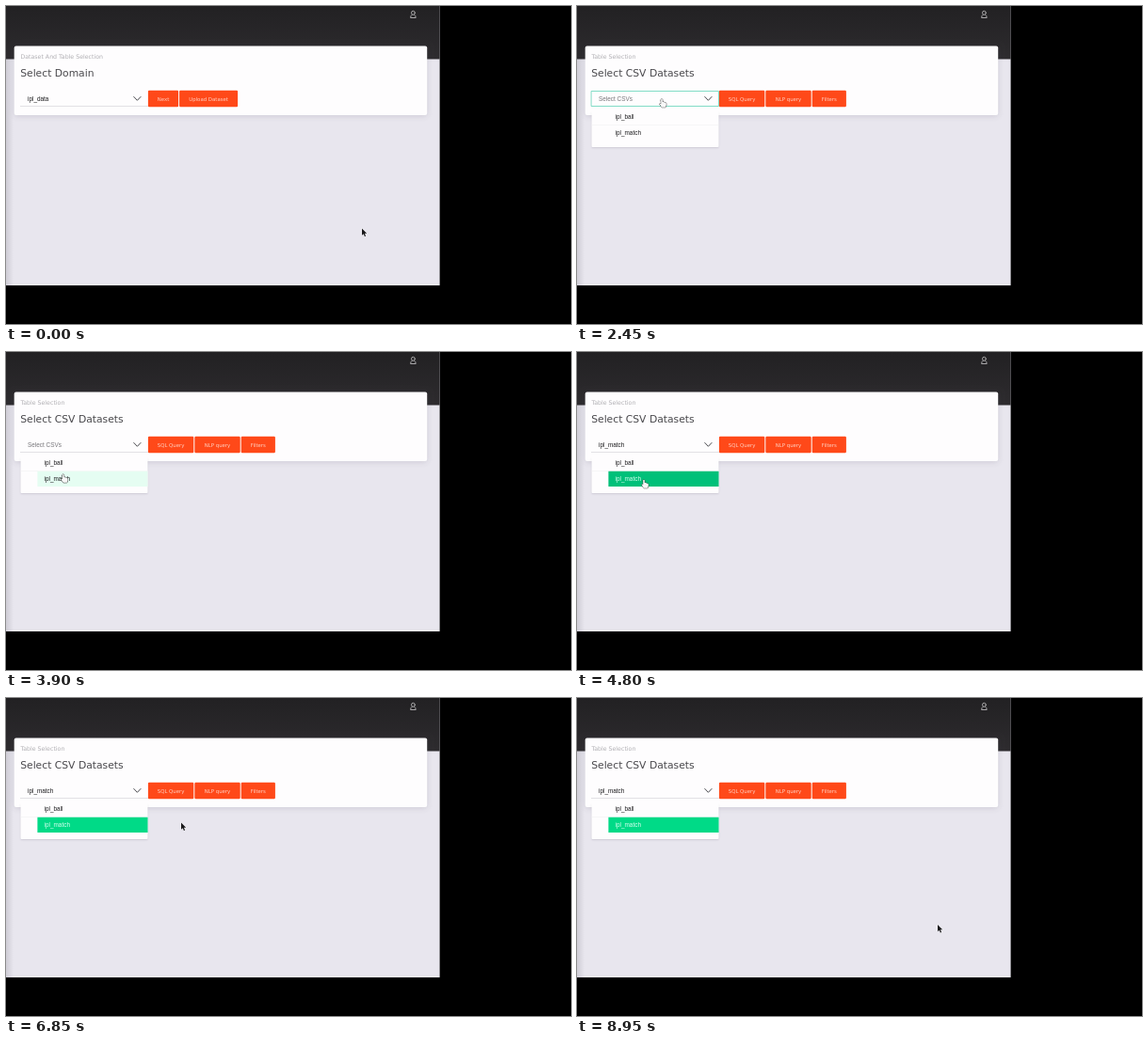
Recreate the animation shown at these times as an HTML page with a canvas. Size 600 by 338 pixels, loop 9050 ms.

```html
<!DOCTYPE html>
<html lang="en">
<head>
<meta charset="utf-8">
<title>Dataset selection</title>
<style>
html, body { margin: 0; width: 100%; height: 100%; overflow: hidden; background: #000; }
canvas { display: block; width: 600px; height: 338px; }
</style>
</head>
<body>
<canvas id="stage"></canvas>
<script>
const W = 600, H = 338, LOOP = 9050, STEP = 50;
const canvas = document.getElementById('stage');
const ctx = canvas.getContext('2d');
const dpr = window.devicePixelRatio || 1;
canvas.width = Math.round(W * dpr);
canvas.height = Math.round(H * dpr);

const UI = '"DejaVu Sans", sans-serif';
const FORM = '"Liberation Sans", Arial, sans-serif';
const INK = '#1c1c1e', CARD = '#fefdfe';

// Moments of the hard changes, in ms
const PAGE = 1800, FOCUS = 2350, BLUR = 2850, PICK = 4400;

// The pointer rests between eased moves
const home = { x: 378, y: 236.5 };
const moves = [
  { from: 300, to: 500, x: 238, y: 140.5 },
  { from: 900, to: 1400, x: 168, y: 99 },
  { from: 1850, to: 2300, x: 90, y: 98.5 },
  { from: 2600, to: 3200, x: 48, y: 126 },
  { from: 3350, to: 3750, x: 58, y: 128 },
  { from: 3750, to: 4250, x: 71, y: 135.5 },
  { from: 4800, to: 5450, x: 186, y: 132.5 },
  { from: 6000, to: 6400, x: 63, y: 107 },
  { from: 6400, to: 6850, x: 186, y: 132.5 },
  { from: 7800, to: 8050, x: 330, y: 192 },
  { from: 8200, to: 8750, x: 383, y: 241 }
];

const select = { x: 15, y: 90, w: 136, h: 17 };
const list = { x: 15.5, y: 108, w: 135, h: 42 };
const rows = ['ipl_ball', 'ipl_match'].map((label, i) =>
  ({ label, x: list.x, y: 110 + 16.7 * i, w: list.w, h: 16.7 }));

// Buttons stand in a row after the select box
function buttonRow(widths) {
  let x = 150.9;
  return Object.entries(widths).map(([label, w]) => {
    const b = { label, x, y: 89.8, w, h: 17.4 };
    x += w + 1;
    return b;
  });
}
const pages = [
  { caption: 'Dataset And Table Selection', title: 'Select Domain',
    buttons: buttonRow({ 'Next': 32.2, 'Upload Dataset': 62 }) },
  { caption: 'Table Selection', title: 'Select CSV Datasets',
    buttons: buttonRow({ 'SQL Query': 48.4, 'NLP query': 48.4, 'Filters': 36.2 }) }
];

const ease = u => u * u * (3 - 2 * u);

function pointer(t) {
  let p = home;
  for (const m of moves) {
    if (t <= m.from) break;
    const e = ease(Math.min(1, (t - m.from) / (m.to - m.from)));
    p = { x: p.x + (m.x - p.x) * e, y: p.y + (m.y - p.y) * e };
  }
  return p;
}

const inside = (p, b) => p.x >= b.x && p.x < b.x + b.w && p.y >= b.y && p.y < b.y + b.h;

function box(x, y, w, h, fill, r = 0) {
  ctx.fillStyle = fill;
  ctx.beginPath();
  ctx.roundRect(x, y, w, h, r);
  ctx.fill();
}

function shadowBox(x, y, w, h, r, blur, alpha) {
  ctx.save();
  ctx.shadowColor = `rgba(60, 55, 80, ${alpha})`;
  ctx.shadowBlur = blur * dpr;
  ctx.shadowOffsetY = dpr;
  box(x, y, w, h, CARD, r);
  ctx.restore();
}

function text(str, x, y, size, color, family = UI, align = 'left') {
  ctx.font = `${size}px ${family}`;
  ctx.textAlign = align;
  ctx.fillStyle = color;
  ctx.fillText(str, x, y);
}

function gradient(x, y, from, to) {
  const g = ctx.createLinearGradient(0, 0, x, y);
  g.addColorStop(0, from);
  g.addColorStop(1, to);
  return g;
}

function stroke(shape, color, width) {
  ctx.strokeStyle = color;
  ctx.lineWidth = width;
  ctx.lineJoin = ctx.lineCap = 'round';
  ctx.stroke(shape);
}

const userIcon = new Path2D('M434.3 7.3a1.9 2 0 1 1-3.8 0a1.9 2 0 1 1 3.8 0M431 9.4Q429.6 10.2 429.6 12.5H435.2Q435.2 10.2 433.8 9.4');
const chevron = new Path2D('M135.8 96.5L139.4 100.3L143 96.5');
const arrow = new Path2D('M0 0V7.2L1.7 5.7L2.9 8.4L4.1 7.9L2.9 5.3H5.2Z');
const hand = new Path2D('M-.8 .8Q0-.2.8 .8V3.5Q1.6 3 2.1 3.8Q3 3.4 3.4 4.3Q4.7 4 4.8 5.3V6.8L4 9.2H0L-2.3 5.8Q-2.5 4.5-.8 5.4Z');

function backdrop() {
  box(0, 0, W, H, '#000');
  box(0, 0, 460.6, 297, '#e8e6ee');
  box(0, 56, 8, 241, gradient(8, 0, 'rgba(70,68,80,.16)', 'rgba(70,68,80,0)'));
  box(0, 0, 460.6, 56.4, gradient(0, 56, '#222123', '#2d2b2e'));
  stroke(userIcon, '#c9c8ca', 0.8);
  shadowBox(8.7, 42.6, 438.5, 73.4, 2, 6, 0.16);
}

function form(t, p, page) {
  text(page.caption, 15.4, 56.1, 6.25, '#b0afb3');
  text(page.title, 15.2, 74.5, 10.75, '#49484c');

  for (const b of page.buttons) {
    box(b.x, b.y, b.w, b.h, inside(p, b) ? '#ff6d46' : '#ff4919', 1.2);
    text(b.label, b.x + b.w / 2, 100.6, 5.4, '#ffd0c2', UI, 'center');
  }

  const second = page === pages[1], picked = t >= PICK;
  if (second) dropdown(p, picked);

  if (t >= FOCUS && t < BLUR) {
    ctx.strokeStyle = '#74d9c0';
    ctx.lineWidth = 0.9;
    ctx.strokeRect(select.x + 0.5, select.y + 0.5, select.w - 1, select.h - 1);
  } else {
    box(select.x, 106, select.w, 0.8, '#d9d8dc');
  }
  const value = !second ? 'ipl_data' : picked ? 'ipl_match' : 'Select CSVs';
  text(value, 23, 100.8, 6.4, second && !picked ? '#77767a' : INK, FORM);
  stroke(chevron, '#343438', 0.9);
}

function dropdown(p, picked) {
  shadowBox(list.x, 112, list.w, 38, 1, 2, 0.16);
  box(list.x, list.y, list.w, 8, CARD);
  box(list.x, 126, list.w, 0.6, '#f0eff2');
  for (const row of rows) {
    const hover = inside(p, row), chosen = picked && row === rows[1];
    const fill = chosen ? (hover ? '#00c079' : '#00da87') : hover ? '#e5fdf2' : CARD;
    if (chosen || hover) box(33.4, row.y, 117.1, 16.2, fill);
    text(row.label, 40.6, row.y + 10.3, 6.4, chosen ? '#d8fff0' : INK, FORM);
  }
}

function cursor(p, page) {
  const links = [select, ...page.buttons];
  if (page === pages[1]) links.push(list);
  const linked = links.some(b => inside(p, b));
  const shape = linked ? hand : arrow;
  ctx.save();
  ctx.translate(p.x, p.y);
  stroke(shape, linked ? '#333' : '#f4f3f6', 1);
  ctx.fillStyle = linked ? '#f8f8f8' : '#19191b';
  ctx.fill(shape);
  ctx.restore();
}

function draw(t) {
  ctx.setTransform(dpr, 0, 0, dpr, 0, 0);
  const p = pointer(t), page = pages[t >= PAGE ? 1 : 0];
  backdrop();
  form(t, p, page);
  cursor(p, page);
}

const start = performance.now();
function tick() {
  const t = (performance.now() - start) % LOOP;
  draw(Math.floor(t / STEP) * STEP);
  requestAnimationFrame(tick);
}
tick();
</script>
</body>
</html>
```
